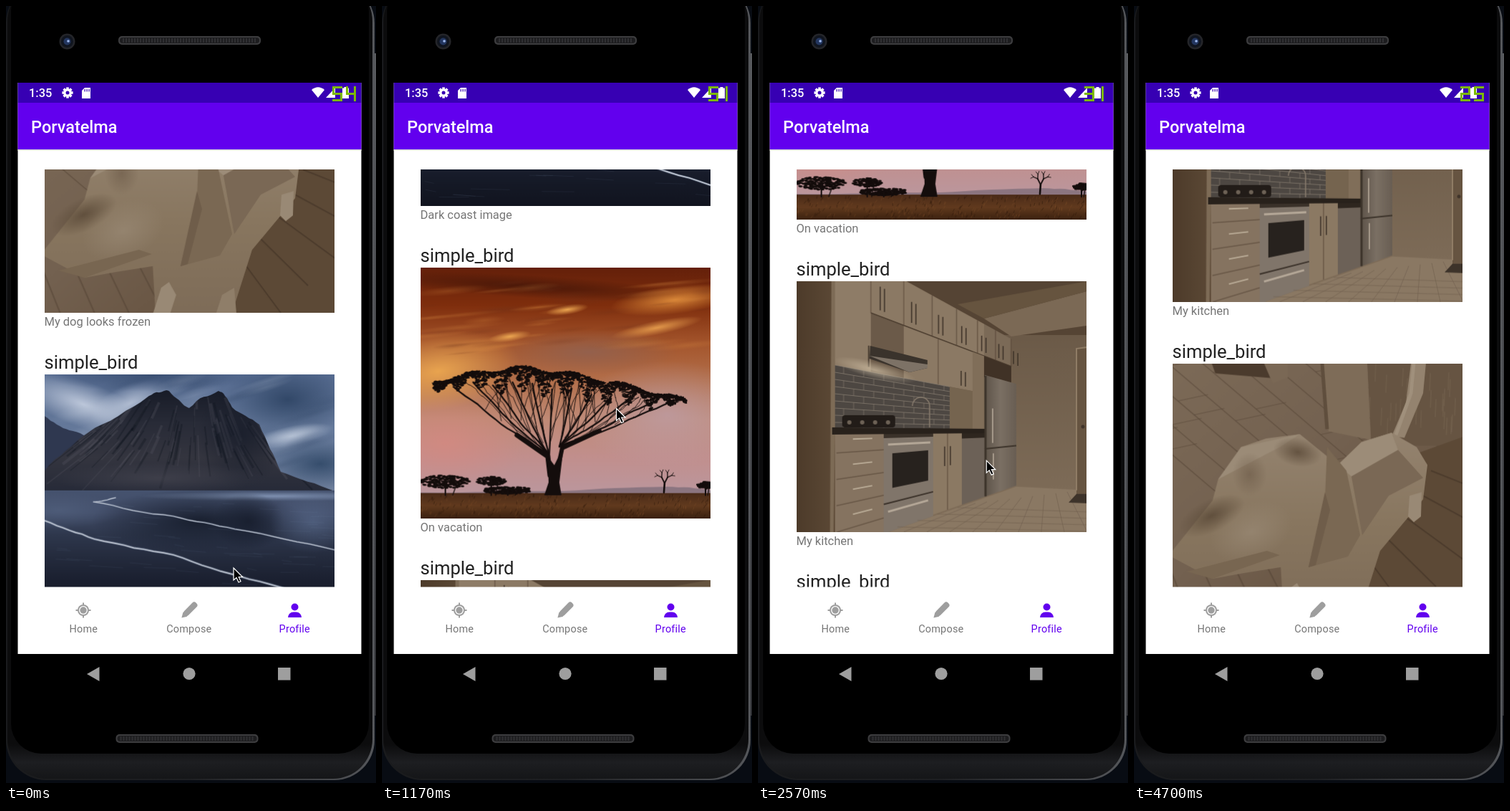
An HTML page with a canvas for the animation above (4980 ms loop, 517 by 1084 pixels).

```html
<!DOCTYPE html>
<html lang="en">
<head>
<meta charset="utf-8">
<title>Photo feed</title>
<style>
html, body { margin: 0; width: 100%; height: 100%; overflow: hidden; background: #080c13; }
canvas { display: block; width: 517px; height: 1084px; }
</style>
</head>
<body>
<canvas id="stage" width="517" height="1084"></canvas>
<script>
const LOOP = 4980, PITCH = 435.5, PW = 405, PH = 350;
const USER = 'simple_bird', TITLE = 'Porvatelma';
const ctx = document.getElementById('stage').getContext('2d');

// ---------- helpers ----------
function layer(w, h, draw) {
  const cv = document.createElement('canvas');
  cv.width = w;
  cv.height = h;
  draw(cv.getContext('2d'));
  return cv;
}
function trace(c, p) {
  c.beginPath();
  for (let i = 0; i < p.length; i += 2) c.lineTo(p[i], p[i + 1]);
}
function poly(c, fill, ...p) {
  trace(c, p);
  c.closePath();
  c.fillStyle = fill;
  c.fill();
}
function line(c, color, width, ...p) {
  trace(c, p);
  c.strokeStyle = color;
  c.lineWidth = width;
  c.stroke();
}
function rect(c, fill, x, y, w, h) {
  c.fillStyle = fill;
  c.fillRect(x, y, w, h);
}
function round(c, fill, x, y, w, h, r) {
  c.beginPath();
  c.roundRect(x, y, w, h, r);
  c.fillStyle = fill;
  c.fill();
}
function oval(c, fill, x, y, rx, ry = rx, turn = 0) {
  c.beginPath();
  c.ellipse(x, y, rx, ry, turn, 0, 7);
  c.fillStyle = fill;
  c.fill();
}
// evenly spaced colours from (x0, y0) to (x1, y1)
function ramp(c, x0, y0, x1, y1, ...colors) {
  const g = c.createLinearGradient(x0, y0, x1, y1);
  colors.forEach((s, i) => g.addColorStop(i / (colors.length - 1), s));
  return g;
}
function glow(c, color, x, y, rx, ry, turn = 0) {
  c.save();
  c.translate(x, y);
  c.rotate(turn);
  c.scale(rx, ry);
  const g = c.createRadialGradient(0, 0, 0, 0, 0, 1);
  g.addColorStop(0, color);
  g.addColorStop(1, color.slice(0, 7) + '00');
  rect(c, g, -1, -1, 2, 2);
  c.restore();
}
function text(c, s, x, y, font, color, align = 'left', gap = 0) {
  c.font = font + ' Roboto, sans-serif';
  c.fillStyle = color;
  c.textAlign = align;
  c.letterSpacing = gap + 'px';
  c.fillText(s, x, y);
}
function random(seed) {
  return () => (seed = (seed * 16807) % 2147483647) / 2147483647;
}
const mix = (a, b, k) => a + (b - a) * k;
// roughens a path by repeated midpoint displacement
function rough(rnd, amp, ...p) {
  for (let pass = 0; pass < 3; pass++, amp /= 2) {
    const q = p.slice(0, 2);
    for (let i = 2; i < p.length; i += 2) {
      q.push((p[i - 2] + p[i]) / 2, (p[i - 1] + p[i + 1]) / 2 + (rnd() - .5) * amp, p[i], p[i + 1]);
    }
    p = q;
  }
  return p;
}

// ---------- photos ----------
function coast(c) {
  const rnd = random(4127);
  rect(c, ramp(c, 0, 0, 0, 165, '#566b90', '#667a9b', '#6f7f9c'), 0, 0, PW, 165);
  glow(c, '#c3cddfee', 55, 42, 100, 32, .35);
  glow(c, '#c3cddfcc', 120, 40, 60, 26, -.4);
  glow(c, '#3a4f72ee', 150, 0, 150, 24);
  glow(c, '#2f4565ee', 340, 35, 90, 50);
  glow(c, '#b6c2d5ee', 345, 86, 60, 14, -.2);
  glow(c, '#324a69ee', 385, 125, 75, 35);
  for (let i = 0; i < 40; i++) {
    glow(c, i % 2 ? '#31466633' : '#b9c5d733', rnd() * PW, rnd() * 130, 30 + rnd() * 30, 5 + rnd() * 7, -.3);
  }
  poly(c, '#2f3850', 0, 165, ...rough(rnd, 6, 0, 58, 35, 78, 75, 95), 75, 165);

  const ridge = rough(rnd, 9, 0, 135, 60, 82, 146, 30, 174, 23, 202, 47, 243, 23, 262, 46, 300, 70, 330, 136, 405, 163);
  c.save();
  trace(c, [0, 166, ...ridge, PW, 166]);
  c.clip();
  rect(c, ramp(c, 0, 20, 0, 165, '#171b27', '#282b37', '#34353f', '#262a38'), 0, 0, PW, 166);
  for (let i = 0; i < 130; i++) {
    const x = 60 + rnd() * 260, y = 30 + rnd() * 80, d = 15 + rnd() * 45;
    const lean = (x - 210) / 110;
    line(c, i % 2 ? '#0e121d55' : '#5c5b6544', 1 + rnd() * 3, x, y, x + lean * d * .5, y + d * .5, x + lean * d, y + d);
  }
  glow(c, '#11172599', 275, 85, 60, 75);
  glow(c, '#4e4d5788', 160, 145, 150, 22);
  c.restore();

  rect(c, ramp(c, 0, 162, 0, 350, '#46536f', '#414c67', '#2e374c', '#242b3d', '#1b2030', '#151926', '#11141f'), 0, 162, PW, 188);
  glow(c, '#8c9fc0cc', 320, 170, 190, 7);
  glow(c, '#141a28dd', 215, 205, 150, 45);
  glow(c, '#161c2bcc', 285, 205, 50, 40);
  glow(c, '#5a6c8e99', 375, 205, 60, 45);
  glow(c, '#56668499', 20, 190, 90, 25);
  for (let i = 0; i < 60; i++) {
    const x = rnd() * 390, y = 180 + rnd() * 160;
    line(c, '#8595b018', 1, x, y, x + 10 + rnd() * 45, y + rnd() * 3);
  }
  const foam = (width, ...p) => {
    const shore = rough(rnd, 5, ...p);
    line(c, '#7e8da866', width * 2, ...shore);
    line(c, '#c3cad5', width, ...shore);
  };
  foam(1.7, 0, 204, 70, 230, 180, 252, 286, 286, 405, 321);
  foam(1.2, 100, 172, 68, 178, 180, 198, 266, 216, 405, 245);
}

function savanna(c) {
  const rnd = random(9721), dark = '#140d0c';
  rect(c, ramp(c, 0, 0, 0, 318, '#64200a', '#7f2e0d', '#a4552c', '#b3704c', '#c08a76', '#c18f8d', '#bb979e'), 0, 0, PW, 320);
  glow(c, '#451608dd', 150, 26, 230, 16, .06);
  glow(c, '#e8953fdd', 355, 45, 90, 20, -.12);
  glow(c, '#eda451dd', 330, 84, 65, 10, -.2);
  glow(c, '#eda850ee', 25, 145, 115, 55, -.15);
  glow(c, '#8f6253cc', 235, 118, 125, 32);
  for (const x of [125, 205]) glow(c, '#f3ae55ee', x, 180 - x * .47 - 25, 30, 7, -.15);
  glow(c, '#d98880aa', 35, 245, 110, 65);
  glow(c, '#bda1afaa', 345, 205, 130, 75);
  for (let i = 0; i < 50; i++) {
    glow(c, i % 2 ? '#e6994833' : '#6b301a33', rnd() * PW, 15 + rnd() * 110, 20 + rnd() * 50, 2 + rnd() * 5, -.1);
  }
  poly(c, '#8b7580', 0, 320, ...rough(rnd, 3, 0, 314, 200, 312, 345, 306, 405, 311), PW, 320);
  rect(c, ramp(c, 0, 315, 0, 350, '#4a2b18', '#613a1e', '#3b210f'), 0, 315, PW, 35);
  for (let i = 0; i < 300; i++) {
    const x = rnd() * PW, y = 320 + rnd() * 30;
    line(c, i % 2 ? '#2b170b88' : '#84532a55', 1, x, y, x + rnd() * 3, y - 4);
  }

  // crown edges as functions of u across its width
  const crownX = u => 18 + u * 352;
  const top = u => 140 + 46 * Math.pow(Math.abs(u - .35) / .65, 1.4) + 3 * Math.sin(u * 31);
  const depth = u => 12 + 26 * Math.sin(Math.PI * u);
  for (let i = 0; i < 1500; i++) {
    const u = rnd(), clump = .6 + .4 * Math.sin(u * 75);
    const y = top(u) + depth(u) * Math.pow(rnd(), 1.7) * clump;
    oval(c, dark, crownX(u), y, 1 + rnd() * 3, .7 + rnd() * 1.2, rnd() - .5);
  }
  c.lineCap = 'round';
  const limbs = 12;
  for (let i = 0; i < limbs; i++) {
    const u = mix(.08, .94, i / (limbs - 1)), x = crownX(u), y = top(u) + depth(u) * .6;
    const left = u < .5, sx = left ? 180 : 194, sy = left ? 262 : 250;
    const bend = mix(sy, y, .45);
    line(c, dark, 2.2, ...rough(rnd, 5, sx, sy, mix(sx, x, .5), bend, x, y));
    for (let j = 1; j < 5; j++) {
      const k = j / 6, bx = mix(sx, x, k), by = mix(sy, y, k);
      const v = Math.min(1, Math.max(0, u + (rnd() - .5) * .16 - (u - .5) * .3));
      line(c, dark, .9, ...rough(rnd, 9, bx, by, mix(bx, crownX(v), .7), mix(by, top(v) + 20, .8), crownX(v), top(v) + 12));
    }
  }
  line(c, dark, 7, 181, 290, 178, 264, 135, 234);
  line(c, dark, 6, 190, 290, 198, 252, 250, 228);
  poly(c, dark, 173, 318, 179, 300, 178, 264, 187, 276, 200, 250, 194, 300, 197, 318);
  const bush = (x, y, rx, ry) => {
    for (let i = 0; i < rx * 6; i++) {
      const a = rnd() * 6.3, r = Math.sqrt(rnd());
      oval(c, dark, x + Math.cos(a) * r * rx, y + Math.sin(a) * r * ry, 2.5, 1.3);
    }
    line(c, dark, 2, x, 318, x, y);
    line(c, dark, 1.3, x + rx * .3, 318, x + rx * .5, y);
  };
  bush(35, 299, 34, 9);
  bush(99, 298, 20, 6);
  bush(122, 311, 34, 5);
  bush(398, 304, 11, 5);
  const bare = (x, y, a, size) => {
    if (size < 4) return;
    const ex = x + Math.cos(a) * size, ey = y + Math.sin(a) * size;
    line(c, dark, size / 5, x, y, ex, ey);
    for (const turn of [-.7, .5]) bare(ex, ey, a + turn + (rnd() - .5) * .4, size * .7);
  };
  bare(340, 314, -1.5, 13);
}

function kitchen(c) {
  const EYE = 207, VANISH = 530, LEFT = 54;
  // height v on the receding wall, measured at its left end
  const wy = (x, v) => EYE + v * (VANISH - x) / (VANISH - LEFT);
  const wall = (fill, x0, x1, v0, v1) => poly(c, fill, x0, wy(x0, v0), x1, wy(x1, v0), x1, wy(x1, v1), x0, wy(x0, v1));
  const along = (color, w, x0, x1, v) => line(c, color, w, x0, wy(x0, v), x1, wy(x1, v));
  const upright = (color, w, x, v0, v1) => line(c, color, w, x, wy(x, v0), x, wy(x, v1));
  const seam = '#55453699', steel = '#b5a898', pale = '#bcae99';

  rect(c, ramp(c, 0, 60, 0, 290, '#6a5947', '#7d6b57'), 0, 0, PW, PH);
  poly(c, '#554434', 130, 0, PW, 0, PW, 75, 290, 75);
  poly(c, '#7b6955', 262, 52, PW, 14, PW, 62, 300, 77);
  poly(c, '#66543f', 225, 32, PW, 0, PW, 14, 262, 52);
  wall('#8b7964', LEFT, 262, -262, -182);
  wall('#7b6a57', 262, 300, -262, -182);
  wall('#8e7c67', LEFT, 104, -262, -90);
  for (let x = 104, gap = 46; x < 300; x += gap, gap *= .86) {
    upright(seam, 1.5, x, -262, -182);
    for (const side of [-3, 3]) upright('#40352b', 1.6, x + gap * .35 + side, -230, -192);
  }
  along('#4f4032', 2, 104, 300, -182);
  wall('#6b5a49', 104, 246, -181, -90);
  wall('#8b7964', 150, 246, -181, -90);
  upright(seam, 1.5, 198, -181, -90);
  for (const x of [101, 230, 236]) upright('#40352b', 1.6, x, -130, -97);

  wall('#4d4742', LEFT, 214, -90, 0);
  for (let row = 0; row < 9; row++) {
    along('#8c8175', .7, LEFT, 214, -90 + row * 10);
    for (let x = 66 + (row % 2) * 14; x < 214; x += 28) upright('#8c8175', .6, x, -90 + row * 10, -80 + row * 10);
  }
  wall('#75644f', 214, 262, -90, 0);
  wall('#806e59', 246, 262, -182, 0);
  glow(c, '#d6c6abaa', 110, 124, 60, 12, .25);
  poly(c, '#3a332c', 103, 90, 183, 110, 183, 121, 158, 127, 102, 108);
  poly(c, '#7d7266', 102, 104, 183, 116, 183, 121, 158, 127);
  c.beginPath();
  c.arc(174, 174, 12, Math.PI, 6.28);
  c.lineTo(186, 204);
  c.strokeStyle = '#85796b';
  c.lineWidth = 1.6;
  c.stroke();

  rect(c, ramp(c, 0, 0, 54, 0, '#4d3b2a', '#5c4936'), 0, 0, LEFT, PH);
  poly(c, '#7d6b56', 49, 0, LEFT, 0, LEFT, 208, 52, PH, 47, PH);
  wall('#857360', LEFT, 122, 5, 170);
  for (let i = 0; i < 4; i++) {
    along(seam, 1.5, 56, 122, 33 + i * 37);
    along(pale, 1.8, 79, 106, 14 + i * 37);
  }
  wall('#80756a', 122, 191, 5, 170);
  wall('#3a3129', 122, 191, 5, 14);
  along(steel, 3, 128, 187, 25);
  wall('#27221e', 134, 184, 40, 98);
  along('#3a3129', 2, 122, 191, 122);
  along(steel, 3, 128, 184, 136);
  wall('#8b7963', 191, 231, 5, 167);
  upright(seam, 1.5, 211, 5, 167);
  for (const x of [207, 215]) upright('#40352b', 1.6, x, 35, 75);
  wall('#6c6157', 231, 263, 5, 167);
  wall('#2e261f', 231, 263, 5, 20);
  poly(c, '#28211b', 50, 204, 264, 206, 264, 212, 50, 214);
  round(c, '#221c18', 64, 187, 74, 17, 4);
  for (let i = 0; i < 4; i++) oval(c, '#6d6256', 74 + i * 18, 197, 3);

  wall('#403226', 262, 300, -182, -130);
  wall(ramp(c, 263, 0, 307, 0, '#5d5349', '#7b7064', '#695e53'), 263, 307, -136, 167);
  upright('#3d342b', 3, 264, -134, 167);
  along('#3d342b', 2, 263, 307, 48);
  upright(steel, 1.6, 274, -55, 35);
  upright(steel, 1.6, 275, 62, 130);

  poly(c, '#8a7863', 122, PH, 122, wy(122, 170), 307, wy(307, 170), 390, 291, PW, 305, PW, PH);
  for (let i = 0; i < 9; i++) line(c, '#6e5d4b88', 1, 150 + i * 32, PH, 250 + i * 16, 310 - i * 2);
  for (let i = 0; i < 4; i++) line(c, '#6e5d4b88', 1, 225 - i * 28, 316 + i * 9, PW, 322 + i * 9);
  rect(c, '#665441', 391, 94, 14, 203);
  line(c, '#8f7c65', 2, 391, 292, 391, 94, PW, 92);
  oval(c, '#40342a', 400, 203, 2.5);
  poly(c, '#3d332a', 380, 309, 391, 297, PW, 297, PW, 310);
}

function puppy(c) {
  const rnd = random(1313), seam = '#57473799';
  rect(c, ramp(c, 0, 0, 300, PH, '#7c6a57', '#736150', '#634f3c'), 0, 0, PW, PH);
  for (let i = 0; i < 9; i++) {
    const x = i * 48 - 150;
    line(c, seam, 1.4, x, 0, x + 270, 230);
    for (let j = 0; j < 4; j++) {
      const k = (j + rnd()) / 4;
      line(c, seam, 1, x + 270 * k, 230 * k, x + 270 * k + 42, 230 * k - 9);
    }
  }
  poly(c, '#4b3b2d', 55, 0, 161, 0, 155, 22, 60, 14);
  poly(c, '#7a6855', 128, 0, 161, 0, 161, 20, 140, 28);
  poly(c, '#665442', 272, 0, PW, 0, PW, 115, 278, 115);
  for (let i = 0; i < 30; i++) {
    const x = 275 + rnd() * 130, y = rnd() * 80;
    line(c, '#78665366', 2, x, y, x - 1, y + 25);
  }
  poly(c, '#7e6c58', 206, 0, 272, 0, 277, 107, 218, 95);
  line(c, '#5f4e3d', 5, 209, 0, 216, 92);
  poly(c, '#5c4936', 344, 125, PW, 103, PW, PH, 240, PH);
  for (let i = 0; i < 5; i++) line(c, '#44352799', 2, 265 + i * 24, 262 - i * 28, 330 + i * 38, PH - i * 38);
  for (let i = 0; i < 4; i++) line(c, seam, 2, i * 45 - 10, 270, 22 + i * 48, PH);

  // tail, body and head
  const coat = ramp(c, 0, 100, 0, PH, '#94836f', '#88765f', '#7e6c58');
  poly(c, '#94836f', 333, 0, 354, 0, 350, 42, 324, 104, 306, 102, 326, 55);
  line(c, '#a0907c', 5, 337, 0, 333, 42, 312, 100);
  poly(c, coat, 231, 142, 264, 110, 306, 97, 341, 117, 356, 142, 350, 190, 290, 262, 262, PH, 155, PH, 150, 260);
  poly(c, coat, 0, 262, 56, 192, 64, 162, 96, 117, 131, 105, 178, 99, 231, 142, 245, 270, 100, 293, 56, 301, 0, 271);
  poly(c, '#9b8b77', 64, 162, 96, 117, 178, 99, 150, 117);
  poly(c, '#9c8c78', 231, 142, 264, 110, 306, 97, 315, 121, 250, 158);
  poly(c, '#7a6855', 250, 158, 315, 121, 350, 160, 302, 185, 265, 240);
  poly(c, '#7a6853', 216, 117, 243, 150, 262, 240, 245, 270, 190, 285, 213, 190);
  poly(c, '#6f5d4a', 213, 180, 220, 205, 200, 282, 190, 285);
  glow(c, '#62513ff0', 175, 124, 34, 20, .2);
  glow(c, '#67554388', 108, 155, 24, 30);
  glow(c, '#5e4d3bee', 55, 213, 50, 23, -.45);
  glow(c, '#9b8b77aa', 110, 235, 60, 40, -.4);
  poly(c, '#786651', 20, 291, 132, 262, 150, 268, 56, 301);
  poly(c, '#998975', 152, PH, 163, 315, 174, 307, 184, 325, 176, PH);
  poly(c, '#8f7e69', 240, PH, 248, 325, 265, 315, 268, PH);
  poly(c, '#998975', 331, 185, 348, 180, 347, 214, 337, 222, 329, 214);
}

const photos = [puppy, coast, savanna, kitchen].map(f => layer(PW, PH, f));
const captions = ['My dog looks frozen', 'Dark coast image', 'On vacation', 'My kitchen'];

// ---------- phone ----------
function speaker(c, x, y) {
  round(c, '#3d3d3f', x, y, 199, 12, 5);
  round(c, '#1d1d1f', x + 2, y + 2, 195, 8, 4);
  for (let i = 0; i < 47; i++) rect(c, '#303033', x + 6 + i * 4, y + 3, 2, 6);
}

function statusIcons(c) {
  const bar = '#3700b3';
  for (let i = 0; i < 8; i++) {
    c.save();
    c.translate(86, 121);
    c.rotate(i * Math.PI / 4);
    rect(c, '#fff', -1.8, -7.6, 3.6, 4);
    c.restore();
  }
  oval(c, '#fff', 86, 121, 5.7);
  oval(c, bar, 86, 121, 2.5);
  poly(c, '#fff', 106, 118, 110, 114, 118, 114, 118, 129, 106, 129);
  for (let i = 0; i < 3; i++) rect(c, bar, 109.5 + i * 3, 116, 1.2, 3.5);
  c.beginPath();
  c.moveTo(436, 128);
  c.lineTo(427, 117);
  c.quadraticCurveTo(436, 109.5, 445, 117);
  c.fillStyle = '#fff';
  c.fill();
  poly(c, '#fff', 447, 128, 460, 128, 460, 114);
  rect(c, '#fff', 470, 114.5, 9, 14.5);
  rect(c, '#fff', 472.5, 113, 4, 2);
}

function tabs(c) {
  const gray = '#9e9e9e';
  oval(c, gray, 108, 843, 8);
  rect(c, gray, 107, 832.5, 2, 21);
  rect(c, gray, 97.5, 842, 21, 2);
  oval(c, '#fff', 108, 843, 6);
  oval(c, gray, 108, 843, 4.7);
  c.save();
  c.translate(256, 843);
  c.rotate(-Math.PI / 4);
  round(c, gray, -9, -4.2, 23, 8.4, 3.5);
  poly(c, gray, -15, 0, -8, -4.2, -8, 4.2);
  c.restore();
  oval(c, '#6200ee', 403.5, 838.5, 5);
  round(c, '#6200ee', 394, 845.5, 19, 7.5, [8, 8, 0, 0]);
  ['Home', 'Compose', 'Profile'].forEach((s, i) =>
    text(c, s, 108.3 + i * 147.5, 874, '14.4px', i === 2 ? '#6200ee' : '#757575', 'center', .25));
  poly(c, gray, 113, 932, 130.5, 922, 130.5, 942);
  oval(c, gray, 256, 931.5, 8.6);
  rect(c, gray, 380, 923, 17.5, 17.5);
}

function phone(c) {
  rect(c, '#080c13', 0, 0, 517, 1084);
  rect(c, ramp(c, 0, 66, 0, 990, '#5a5c60', '#2c2d31'), 514, 66, 3, 924);
  round(c, ramp(c, 0, 0, 515, 0, '#1a1b1d', '#1e1f22', '#54565a'), 0, -32, 515, 1112, 56);
  round(c, ramp(c, 0, 1030, 0, 1080, '#0c0c0d', '#1d1e21', '#141517'), 2, -34, 510, 1112, 55);
  round(c, '#000', 7, -34, 500, 1077, 42);
  speaker(c, 157, 42);
  speaker(c, 153.5, 1016);
  oval(c, '#242529', 85.5, 49.5, 11);
  oval(c, '#10151f', 85.5, 49.5, 8.5);
  oval(c, '#23365f', 85.5, 49.5, 5);
  oval(c, '#9db9ee', 87, 49, 1.8);

  rect(c, '#fff', 16.5, 107, 480, 797);
  rect(c, '#3700b3', 16.5, 107, 480, 28);
  rect(c, '#6200ee', 16.5, 135, 480, 65);
  rect(c, ramp(c, 0, 200, 0, 202, '#c4c4c4', '#ffffff'), 16.5, 200, 480, 2);
  text(c, TITLE, 35, 177, '500 23.5px', '#fff');
  text(c, '1:35', 32, 127, '500 16.4px', '#fff');
  statusIcons(c);
  tabs(c);
}
const frame = layer(517, 1084, phone);

// ---------- motion ----------
// the picture refreshes ten times between beats
const beats = [0, 600, 1170, 1740, 2270, 2840, 3370, 3930, 4490, 5015];
function snap(t) {
  const i = beats.findIndex(b => b > t) - 1;
  const step = (beats[i + 1] - beats[i]) / 10;
  return Math.min(4700, beats[i] + Math.floor((t - beats[i]) / step + .001) * step);
}
function at(keys, t, k) {
  const i = keys.findIndex(p => p[0] > t);
  if (i < 0) return keys[keys.length - 1][k];
  const a = keys[i - 1], b = keys[i];
  return mix(a[k], b[k], (t - a[0]) / (b[0] - a[0]));
}
// time, feed top, pointer tip
const poses = [[0, 78.5, 318, 784], [600, -230, 326.5, 626.5], [1170, -506, 327.5, 561.5],
  [2164, -812.5, 321.5, 672], [3011, -1050.5, 316.5, 590], [3930, -1218, 317.5, 667.5],
  [4150, -1238, 330, 720], [4430, -1243.5, 424, 991], [4700, -1243.5, 472, 1086]];

const rates = ['54', '51', '31', '39', '25'];
// seven bars clockwise from the top, the middle one last
const lit = { 2: '01346', 3: '01236', 4: '1256', 5: '02356', 9: '012356' };
function bar(x, y, k) {
  const green = '#7cb900';
  if (k % 3 === 0) rect(ctx, green, x, k === 6 ? y + 9 : y + k * 6, 14, 3);
  else rect(ctx, green, k < 3 ? x + 11 : x, k === 2 || k === 4 ? y + 10 : y, 3, 11);
}
function counter(s) {
  [...s].forEach((d, i) => {
    const x = 456 + i * 19;
    if (d === '1') rect(ctx, '#7cb900', x + 5, 112, 3, 21);
    else for (const k of lit[d]) bar(x, 112, +k);
  });
}

function feed(y0) {
  ctx.save();
  ctx.beginPath();
  ctx.rect(53.5, 228, 405.5, 582.5);
  ctx.clip();
  for (let i = 0; i < 5; i++) {
    const y = y0 + i * PITCH;
    text(ctx, USER, 53.5, y - 8, '25.6px', '#212121');
    ctx.drawImage(photos[i % 4], 53.5, y, 405.5, 349.5);
    text(ctx, captions[i % 4], 53.5, y + 367.5, '16.5px', '#757575');
  }
  ctx.restore();
}

function arrow(x, y) {
  ctx.save();
  ctx.translate(x, y);
  poly(ctx, '#000', 0, 0, 0, 17, 4, 13.5, 7, 20, 10, 18.7, 7.2, 12.5, 12.5, 12.5);
  ctx.strokeStyle = '#fff';
  ctx.lineWidth = 1.2;
  ctx.stroke();
  ctx.restore();
}

function render(now) {
  const s = snap(now % LOOP);
  ctx.drawImage(frame, 0, 0);
  feed(at(poses, s, 1));
  counter(rates[Math.min(4, Math.floor((s + 135) / 1000))]);
  arrow(at(poses, s, 2), at(poses, s, 3));
}

const start = performance.now();
function tick() {
  render(performance.now() - start);
  requestAnimationFrame(tick);
}
tick();
</script>
</body>
</html>
```
